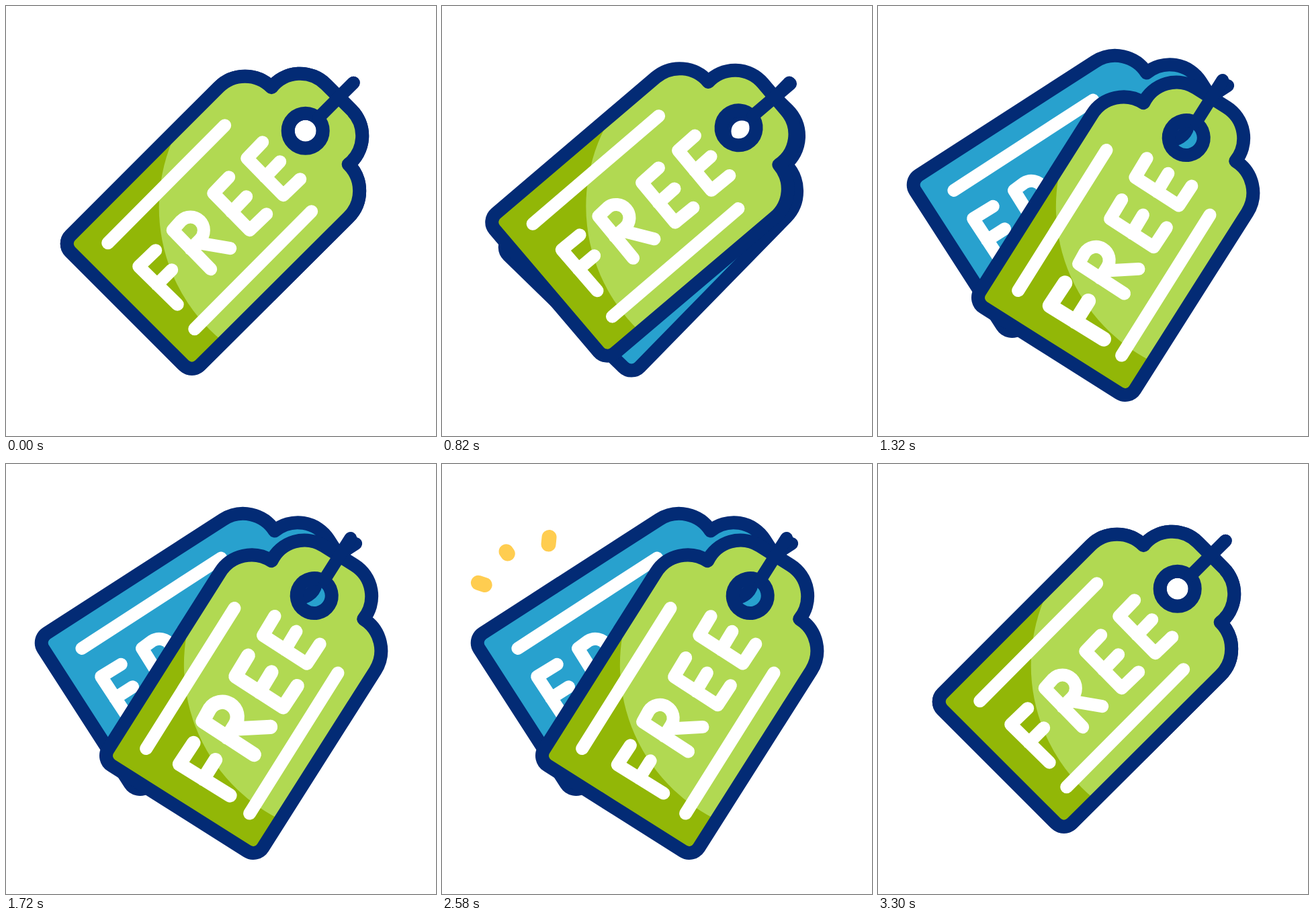
An HTML page for the animation above (3520 ms loop, 640 by 640 pixels).

```html
<!DOCTYPE html>
<html lang="en">
<head>
<meta charset="utf-8">
<title>Free tags</title>
<style>
  html, body { margin: 0; width: 100%; height: 100%; overflow: hidden; background: #fff; }
  svg { display: block; width: 100vw; height: 100vh; }
  path, line, circle { stroke-linecap: round; stroke-linejoin: round; }
  .line { fill: none; stroke: #032b75; stroke-width: 20; }
  .white { fill: none; stroke: #fff; stroke-width: 19; }
  .mark { stroke: #ffcd50; stroke-width: 22; }
</style>
</head>
<body>
<svg viewBox="0 0 640 640" role="img" aria-label="FREE">
  <defs>
    <path id="outline" d="M315.8 120.3A55.5 55.5 0 0 1 394.5 120.5A54.3 54.3 0 0 1 475.4 115.9L513.6 154.1A54.3 54.3 0 0 1 509 235A55.5 55.5 0 0 1 509.2 313.7L288 534A17 17 0 0 1 264 534L95 365A17 17 0 0 1 95 341Z"/>
    <clipPath id="body"><path id="cut" clip-rule="evenodd"/></clipPath>
    <g id="trim">
      <use href="#outline" class="line"/>
      <circle class="line" cx="445" cy="185" r="26"/>
      <path class="line" d="M465 165L516.5 113.5" style="stroke-width:19"/>
      <path class="white" d="M151 352L325 177M280 480L454 305"/>
    </g>
    <path id="F" class="white" d="M222 363L197 387L254.5 443.5M224 414L246 392"/>
    <path id="R" class="white" d="M304 391L247.5 333L260 319A19.8 19.8 0 0 1 288 347L274 361M286 352L333 360"/>
    <path id="E" class="white" d="M331 254L308 278L362 333L387 309M335 306L357 283"/>
  </defs>
  <g id="near"></g>
  <g id="far" transform="rotate(180 306 330)"></g>
  <g transform="translate(.7 .7)">
    <g id="back">
      <rect width="640" height="640" fill="#28a1ce" clip-path="url(#body)"/>
      <use href="#trim"/>
      <g id="backWord" transform="translate(-9 0)"></g>
    </g>
    <g id="front">
      <g clip-path="url(#body)">
        <rect width="640" height="640" fill="#92b707"/>
        <circle cx="484" cy="299" r="257" fill="#b1d952"/>
      </g>
      <use href="#trim"/>
      <g id="frontWord"></g>
    </g>
  </g>
</svg>
<script>
const LOOP = 3520;
const $ = id => document.getElementById(id);
const make = (parent, tag, attrs) => {
  const el = document.createElementNS('http://www.w3.org/2000/svg', tag);
  for (const k in attrs) el.setAttribute(k, attrs[k]);
  return parent.appendChild(el);
};
const clamp = x => Math.min(1, Math.max(0, x));
const sine = x => (1 - Math.cos(Math.PI * x)) / 2;
const cubic = x => x < .5 ? 4 * x ** 3 : 1 - 4 * (1 - x) ** 3;

// the clip shape is the outline with a hole whose rim lies under the eyelet ring
$('cut').setAttribute('d', $('outline').getAttribute('d') +
  'M467 185A22 22 0 1 0 423 185A22 22 0 1 0 467 185Z');

// swing keys: [start, end, angle, ease]
const swings = {
  front: [[220, 580, 7.8, sine], [580, 1290, -12.7, cubic], [2700, 3300, 0, sine]],
  back: [[220, 580, -5.3, sine], [560, 1210, 12.2, cubic], [2600, 3300, 0, sine]]
};
const angleAt = (keys, t) => {
  let a = 0;
  for (const [from, to, goal, ease] of keys) a += (goal - a) * ease(clamp((t - from) / (to - from)));
  return a;
};

// letters: [shape, centre x, centre y, offset x, offset y]
const word = [['F', 226, 403, 0, 0], ['R', 290, 351, 0, 0], ['E', 347, 294, 0, 0], ['E', 347, 294, 50, -52]];
const spell = id => word.map(([c, , , x, y]) =>
  make($(id), 'use', { href: '#' + c, transform: `translate(${x} ${y})` }));
spell('backWord');
const letters = spell('frontWord');

const bounce = x => {
  const h = x / 157;
  return h <= 0 || h >= 6 ? 1 : 1 + .44 * Math.exp(-.51 * h) * Math.sin(Math.PI * h);
};

// sparks: [angle, fixed radius, moving radius] around (150, 208)
const sparks = [[198, 101, 70], [235, 91, 103], [275.5, 89, 121]];
const bursts = [['far', 1840, 2040, 2140, 2380], ['near', 2060, 2260, 2400, 2670]].map(([id, ...times]) => ({
  times, lines: sparks.map(() => make($(id), 'line', { class: 'mark' }))
}));

function drawBurst({ times: [a, b, c, d], lines }, t) {
  const p = sine(clamp((t - a) / (b - a))) * clamp((d - t) / (d - c));
  lines.forEach((el, i) => {
    const [deg, r0, r1] = sparks[i];
    const q = deg * Math.PI / 180, r = r0 + (r1 - r0) * p;
    el.style.display = p > 0 ? '' : 'none';
    el.setAttribute('x1', 150 + r0 * Math.cos(q));
    el.setAttribute('y1', 208 + r0 * Math.sin(q));
    el.setAttribute('x2', 150 + r * Math.cos(q));
    el.setAttribute('y2', 208 + r * Math.sin(q));
  });
}

function draw(t) {
  for (const id in swings)
    $(id).setAttribute('transform', `rotate(${angleAt(swings[id], t)} 498 131.5)`);
  letters.forEach((el, i) => {
    const [, cx, cy, x, y] = word[i];
    el.setAttribute('transform',
      `translate(${cx + x} ${cy + y}) scale(${bounce(t - 1300 - 35 * i)}) translate(${-cx} ${-cy})`);
  });
  bursts.forEach(b => drawBurst(b, t));
}

let start;
function tick() {
  const now = performance.now();
  start ??= now;
  draw((now - start) % LOOP);
  requestAnimationFrame(tick);
}
tick();
</script>
</body>
</html>
```
